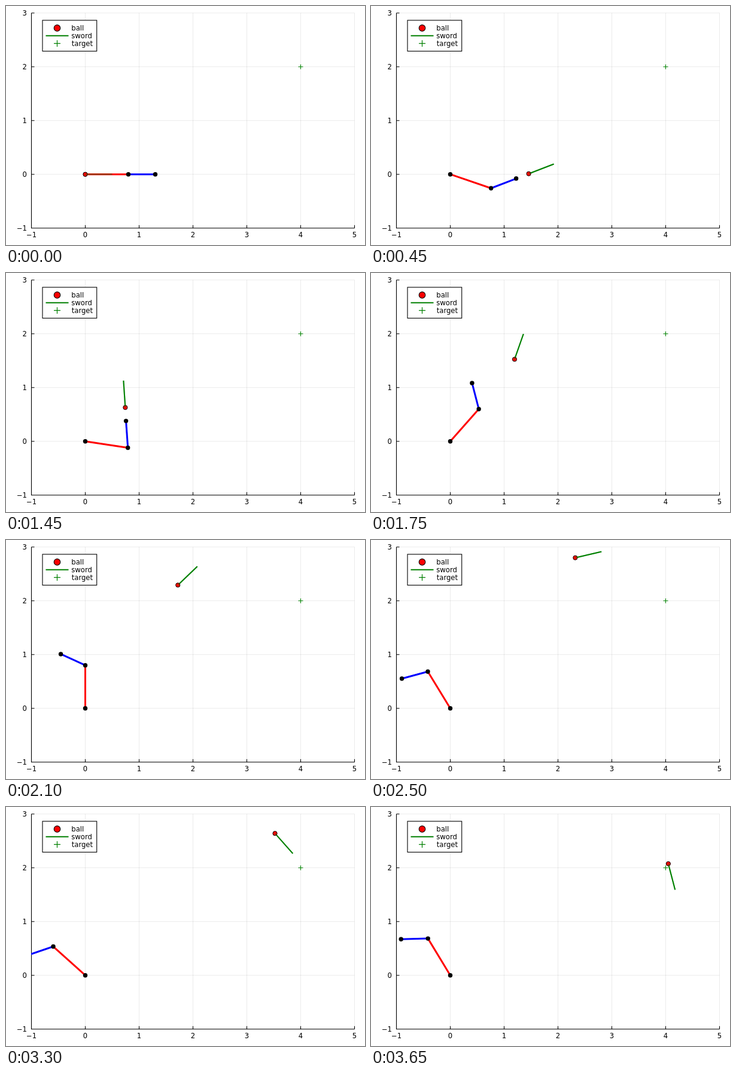
Animation, 600 px wide and 400 px high, one loop 3.7 s. Source, as an HTML page:

```html
<!DOCTYPE html>
<html lang="en">
<head>
<meta charset="utf-8">
<title>Throwing arm</title>
<style>
html, body { margin: 0; width: 100%; height: 100%; overflow: hidden; background: #fff; }
svg { display: block; width: 600px; height: 400px; }
text { font: 11.6px "DejaVu Sans", sans-serif; fill: #000; }
</style>
</head>
<body>
<svg viewBox="0 0 600 400">
  <defs><clipPath id="plot"><rect x="42" y="11.5" width="541" height="360.5"/></clipPath></defs>
  <path id="grid" stroke="#000" stroke-opacity=".08" fill="none"/>
  <path id="axes" stroke="#000" stroke-width="1.1" fill="none"/>
  <g id="labels"></g>
  <g clip-path="url(#plot)" fill="none">
    <path id="sword" stroke="#008000" stroke-width="2"/>
    <path id="upper" stroke="#f00" stroke-width="3"/>
    <path id="fore" stroke="#00f" stroke-width="3"/>
    <g fill="#000">
      <circle id="base" r="3.7"/>
      <circle id="elbow" r="3.7"/>
      <circle id="wrist" r="3.7"/>
    </g>
    <circle id="ball" r="3.6" fill="#f00" stroke="#000"/>
    <path id="glaze" stroke="#008000" stroke-width="2" stroke-opacity=".45"/>
    <path d="M488.5 101.7h8M492.5 97.7v8" stroke="#008000" stroke-width="1.1"/>
  </g>
  <g>
    <rect x="61" y="23.9" width="90.7" height="51.7" fill="#fff" stroke="#000" stroke-width="1.1"/>
    <circle cx="85.5" cy="36.9" r="5.3" fill="#f00" stroke="#000" stroke-width="1.1"/>
    <path d="M66.5 49.8h38" stroke="#008000" stroke-width="2"/>
    <path d="M80 62.7h11M85.5 57.2v11" stroke="#008000" stroke-width="1.2"/>
    <text x="109.3" y="41">ball</text>
    <text x="109.3" y="54">sword</text>
    <text x="109.8" y="67">target</text>
  </g>
</svg>
<script>
const STEP = 50, STEPS = 74, RELEASE = 29;
const UPPER = 0.8, FORE = 0.5, GRIP = 0.25, SWORD = 0.5;
const DT = 0.025, G = 9.81;

// step, upper angle, its rate, forearm angle, its rate (degrees)
const POSES = [
  [0, 0, -1.8, 0, 2.8],
  [9, -18.9, -2.45, 21.1, 1.85],
  [17, -37.1, -1.75, 36.3, 2.7],
  [22, -41.6, 0, 55.3, 6],
  [29, -8.6, 11.9, 94, -3.85],
  [42, 90, 4.8, 155.4, 6.7],
  [58, 138.4, 1.2, 207, -0.3],
  [73, 121.2, -3.5, 181.4, -3.2]
];
const FLIGHT = { x: 0.743, y: 0.629, vx: 3.005, vy: 6.71, angle: 93.8, spin: -153.8 };

const $ = id => document.getElementById(id);
const px = x => 132.5 + 90 * x;
const py = y => 281.7 - 90 * y;
const add = (p, deg, r) => {
  const a = deg * Math.PI / 180;
  return [p[0] + r * Math.cos(a), p[1] + r * Math.sin(a)];
};
const at = p => px(p[0]).toFixed(2) + " " + py(p[1]).toFixed(2);
const line = (id, p, q) => $(id).setAttribute("d", "M" + at(p) + "L" + at(q));
const dot = (id, p) => {
  $(id).setAttribute("cx", px(p[0]));
  $(id).setAttribute("cy", py(p[1]));
};

function hermite(s, w, a, va, b, vb) {
  const s2 = s * s, s3 = s2 * s;
  return a + (b - a) * (3 * s2 - 2 * s3) + w * (va * (s3 - 2 * s2 + s) + vb * (s3 - s2));
}

function pose(k) {
  let i = 0;
  while (i < POSES.length - 2 && POSES[i + 1][0] <= k) i++;
  const a = POSES[i], b = POSES[i + 1], w = b[0] - a[0], s = (k - a[0]) / w;
  return [1, 3].map(j => hermite(s, w, a[j], a[j + 1], b[j], b[j + 1]));
}

function draw(k) {
  const origin = [0, 0], [a1, a2] = pose(k);
  const elbow = add(origin, a1, UPPER), wrist = add(elbow, a2, FORE);
  let ball = origin, angle = 0;
  if (k >= RELEASE) {
    const t = (k - RELEASE) * DT, f = FLIGHT;
    ball = [f.x + f.vx * t, f.y + f.vy * t - G * t * t / 2];
    angle = f.angle + f.spin * t;
  } else if (k > 0) {
    ball = add(wrist, a2, GRIP);
    angle = a2;
  }
  const tip = add(ball, angle, SWORD);
  line("upper", origin, elbow);
  line("fore", elbow, wrist);
  line("sword", ball, tip);
  line("glaze", ball, tip);
  dot("base", origin);
  dot("elbow", elbow);
  dot("wrist", wrist);
  dot("ball", ball);
  $("wrist").style.display = wrist[0] < -1 ? "none" : "";
}

function label(text, x, y, anchor) {
  const el = document.createElementNS("http://www.w3.org/2000/svg", "text");
  el.setAttribute("x", x);
  el.setAttribute("y", y);
  el.setAttribute("text-anchor", anchor);
  el.textContent = String(text).replace("-", "\u2212");
  $("labels").append(el);
}

function chart() {
  const left = 42.5, right = 582.5, top = 11.7, bottom = 371.7;
  let grid = "", axes = `M${left} ${top}V${bottom}H${right}`;
  for (let x = -1; x <= 5; x++) {
    grid += `M${px(x)} ${top}V${bottom}`;
    axes += `M${px(x)} ${bottom}v-5`;
    label(x, px(x), 387.3, "middle");
  }
  for (let y = -1; y <= 3; y++) {
    grid += `M${left} ${py(y)}H${right}`;
    axes += `M${left} ${py(y)}h5`;
    label(y, 35, py(y) + 4.3, "end");
  }
  $("grid").setAttribute("d", grid);
  $("axes").setAttribute("d", axes);
}

chart();
draw(0);
const start = performance.now();
function tick() {
  draw(Math.floor((performance.now() - start) / STEP) % STEPS);
  requestAnimationFrame(tick);
}
requestAnimationFrame(tick);
</script>
</body>
</html>
```
